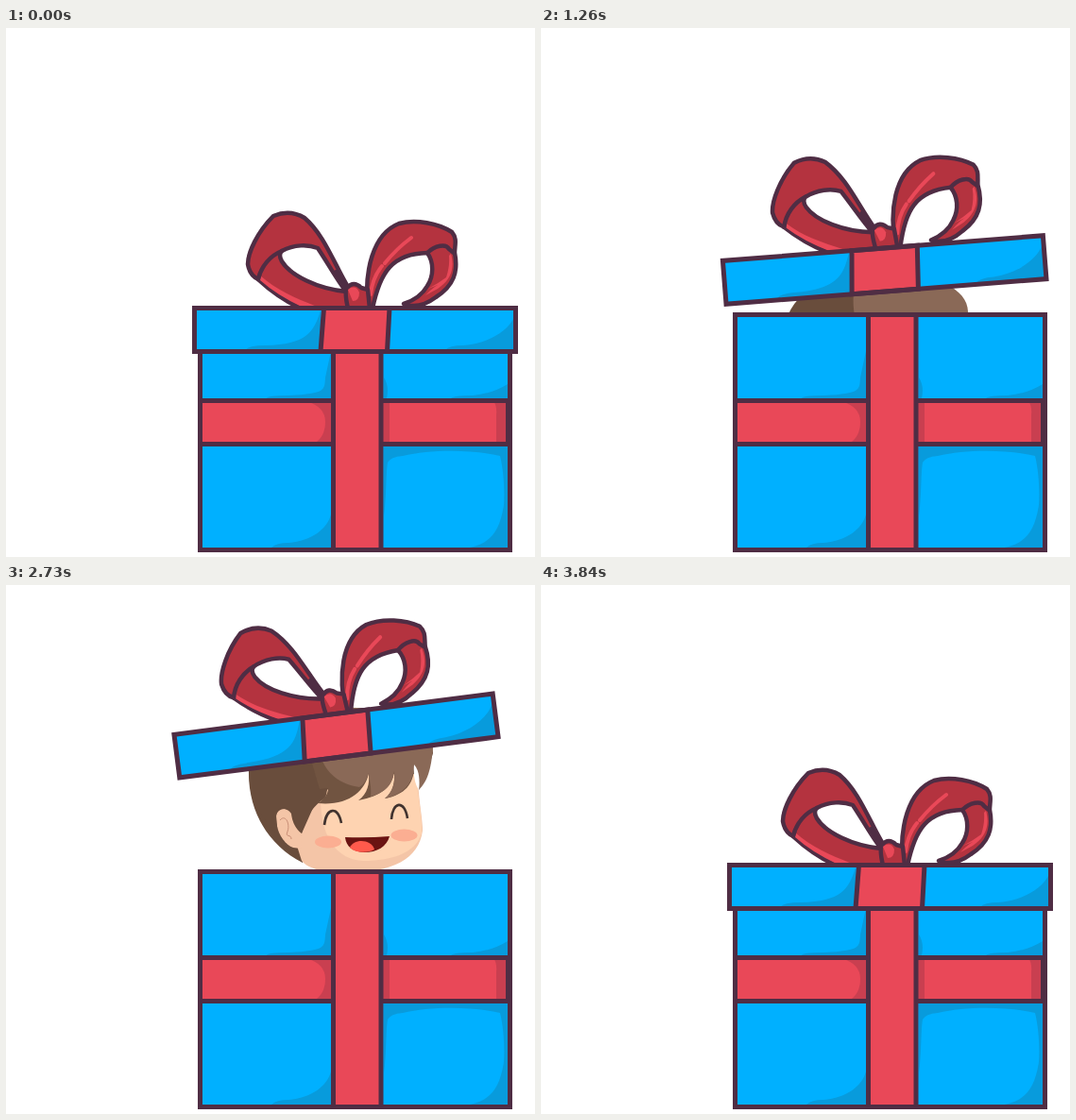
An HTML page for the animation above (4.32 s loop, 560 by 560 pixels).

```html
<!DOCTYPE html>
<html lang="en">
<head>
<meta charset="utf-8">
<title>Surprise box</title>
<style>
  html, body { margin: 0; height: 100%; overflow: hidden; background: #fff; }
  svg { display: block; width: 100%; height: 100%; }
  .line { stroke: #4f2d44; stroke-width: 5; }
  .bow { stroke: #4f2d44; stroke-width: 4.5; stroke-linejoin: round; stroke-linecap: round; }
  .none { fill: none; }
  .blue { fill: #00b0ff; }
  .shade { fill: #089bdc; }
  .red { fill: #e94858; }
  .deep { fill: #c93f50; }
  .wine { fill: #b4333f; }
  .skin { fill: #fed3b1; }
  .tan { fill: #f4c5a7; }
  .hair { fill: #694d3c; }
  .shine { fill: #8a6957; }
</style>
</head>
<body>
<svg viewBox="0 0 560 560">
  <g id="tuft" class="shine"><path d="M372 98Q386 95 398 100Q386 101 373 104Q380 100 372 98Z"/></g>

  <g id="child">
    <path fill="#e2ab8e" d="M292 304Q306 286 342 287H380Q426 278 444 304Z"/>
    <path fill="#efbd9e" d="M342 276H377V286Q360 290 342 286Z"/>
    <path class="hair" d="M257 180C257 135 300 110 352 110C412 108 452 130 452 158L445 180L330 225L314 274C278 256 257 220 257 180Z"/>
    <path class="tan" d="M313 243L341 180H436C436 205 441 225 441 240C437 270 410 284 360 285C338 284 320 281 313 272L308 256Z"/>
    <path class="skin" d="M333 205L350 180H434C436 205 441 225 440 243C434 263 410 272 378 272C348 270 333 245 333 205Z"/>
    <path class="tan" d="M304 258C294 255 285 239 286 225C287 215 297 215 302 222L313 243L312 259Z"/>
    <path fill="none" stroke="#c98f77" d="M290 229C296 222 301 233 298 241C295 248 302 243 302 249"/>
    <path class="hair" d="M257 175L300 160H348L341 196C338 198 342 204 333 209C321 219 316 229 313 243C306 238 302 229 302 220C295 214 287 218 286 224L288 246C270 226 257 205 257 175Z"/>
    <path fill="#715441" d="M320 155H432V175C431 190 423 202 401 206C410 199 412 188 411 177C409 194 398 203 373 208C383 201 385 190 384 179C380 199 362 214 330 211C337 207 341 201 341 195L332 196Z"/>
    <path class="shine" d="M333 161C329 145 330 125 336 111C405 104 452 125 452 152C450 176 446 188 437 197C438 184 436 176 432 170C432 186 424 201 401 206C410 199 412 188 411 177C409 192 402 199 386 204C387 196 385 185 384 179C382 186 379 191 374 194C354 191 339 180 333 161Z"/>
    <path fill="#fff" d="M432 170C438 177 438 187 437 197C433 191 431 182 432 170Z"/>
    <g fill="none" stroke="#41332f" stroke-width="2.6">
      <path d="M337 234C339 216 351 213 355 232M408 228C409 209 422 207 425 227"/>
    </g>
    <g fill="#fbae92">
      <ellipse cx="341" cy="252" rx="14" ry="6.5"/>
      <ellipse cx="421.500" cy="245" rx="14" ry="6.500"/>
    </g>
    <path fill="#6b1412" d="M359 247Q382 248 406 246C403 257 393 263 379 263C367 262 360 257 359 247Z"/>
    <path fill="#ff5a4c" d="M364 258C368 248 387 249 390 260C383 264 370 264 364 258Z"/>
  </g>

  <g id="box">
    <path class="blue" d="M205.500 303.500H533.500V552.500H205.500Z"/>
    <path class="shade" d="M276 392Q276 389 300 389C339 387 337 383 338 370L344 342V392ZM400 370Q406 379 403 392H400ZM471 392Q474 389 494 389Q515 387 531 377V392Z
      M281 550Q286 545 299 545C324 543 340 530 344 515V550ZM400 443H531V550H400Z"/>
    <path class="blue" d="M400 517C403 493 402 471 404 460Q407 454 420 453C450 446 492 446 523 453C527 469 528 490 527 505C523 530 515 545 491 550H400Z"/>
    <path class="deep" d="M206 395H533V440H206Z"/>
    <path class="red" d="M206 395H318Q338 401 338 417Q338 433 326 440H206ZM406 395H516Q520 400 519 410V440H406ZM347 304H397V552H347Z"/>
    <path class="line none" d="M205.500 303.500H533.500V552.500H205.500ZM346.500 303V552M397 303V552M206 394.500H346M206 440.500H346M397 394.500H533M397 440.500H533M531.500 394V440"/>
  </g>

  <g id="hands" class="skin">
    <path id="hand" d="M253 304C255 290 279 288 298 296L296 302Q288 302 283 304C284 309 285 315 283 319Q279 323 275 313C275 323 269 323 267 313C267 323 260 322 259 313C254 318 252 309 253 304Z"/>
    <use href="#hand" transform="translate(754) scale(-1 1)"/>
  </g>

  <g id="lid">
    <path class="wine bow" fill-rule="evenodd" d="M362 274C347 249 337 219 316 201C306 195 295 194 283 199C266 216 256 238 256 250Q258 262 267 266Q286 284 312 297H368Z
      M292 236C305 229 320 229 330 233C342 251 350 266 360 279C330 276 301 262 292 247Q288 240 292 236Z"/>
    <path class="red" d="M269 262C287 278 305 285 329 295H313Q287 283 269 267Z"/>
    <path class="bow none" d="M267 266C270 252 280 241 292 236M350 258L361 277"/>
    <path class="wine bow" d="M383 297C379 258 388 218 416 207C434 202 458 207 472 216C478 223 475 230 475 238C479 258 474 273 455 285C443 294 431 296 421 292C433 288 441 282 446 273C453 262 453 248 446 238C409 239 396 258 388 297Z"/>
    <path class="red" d="M471 239C475 253 472 266 457 276L444 283Q454 272 462 270L447 276Q458 270 466 264Q470 252 469 241Z"/>
    <path fill="none" stroke="#e94858" stroke-width="4" stroke-linecap="round" d="M429 222Q413 234 401 249M398 252Q388 264 386 282"/>
    <path class="bow none" d="M446 238C454 230 466 228 469 234L474 238"/>
    <path class="wine bow" d="M362 297Q358 279 361 275Q368 267 376 275L383 277L385 297Z"/>
    <path class="red" d="M362 277Q370 271 374 280Q374 289 367 289Z"/>
    <path class="blue" d="M199.500 296.500H539.500V342.500H199.500Z"/>
    <path class="shade" d="M254 341Q256 336 275 336C318 335 326 322 333 299V341ZM465 341Q469 336 484 336C509 334 531 322 538 306V341Z"/>
    <path class="line red" d="M336.500 296.500H406L403.500 342.500H333Z"/>
    <path class="line none" d="M199.500 296.500H539.500V342.500H199.500Z"/>
  </g>
</svg>
<script>
  const LOOP = 4320, STEP = 30;
  const $ = id => document.getElementById(id);

  // Poses: lid x, lid y, lid angle, how far the child is lowered
  const shut = [0, 0, 0, 230];
  const crack = [1, -10.5, -1.15, 225];
  const hop = [-2.5, -32.5, -3, 225];
  const lift = [-5.8, -63.5, -4.5, 148];
  const peek = [-16, -74, -6, 108];
  const smile = [-23.3, -131, -7.5, 45];
  const rise = [-20, -160, -7.3, 20];
  const out = [-17, -183.5, -7, 0];

  const keys = [
    [0, shut], [150, shut], [180, crack], [240, hop], [300, crack], [330, shut],
    [750, shut], [780, lift], [810, peek], [1230, peek], [1260, lift], [1320, shut],
    [1740, shut], [1770, crack], [1950, smile], [2700, smile], [2730, rise], [2760, out],
    [3690, out], [3720, rise], [3750, smile], [3840, shut], [LOOP, shut]
  ];

  const ease = p => p * p * (3 - 2 * p);

  function poseAt(t) {
    const i = keys.findIndex(k => k[0] > t);
    const [t0, a] = keys[i - 1], [t1, b] = keys[i];
    const p = ease((t - t0) / (t1 - t0));
    return a.map((v, n) => v + (b[n] - v) * p);
  }

  function draw() {
    const t = Math.floor(performance.now() % LOOP / STEP) * STEP;
    const [x, y, angle, drop] = poseAt(t);
    $('lid').setAttribute('transform', `translate(${x} ${y}) rotate(${angle} 369.5 319.5)`);
    $('child').setAttribute('transform', `translate(0 ${drop})`);
    const standing = t >= 2760 && t < 3720;
    for (const id of ['hands', 'tuft']) $(id).style.display = standing ? '' : 'none';
    requestAnimationFrame(draw);
  }
  draw();
</script>
</body>
</html>
```
